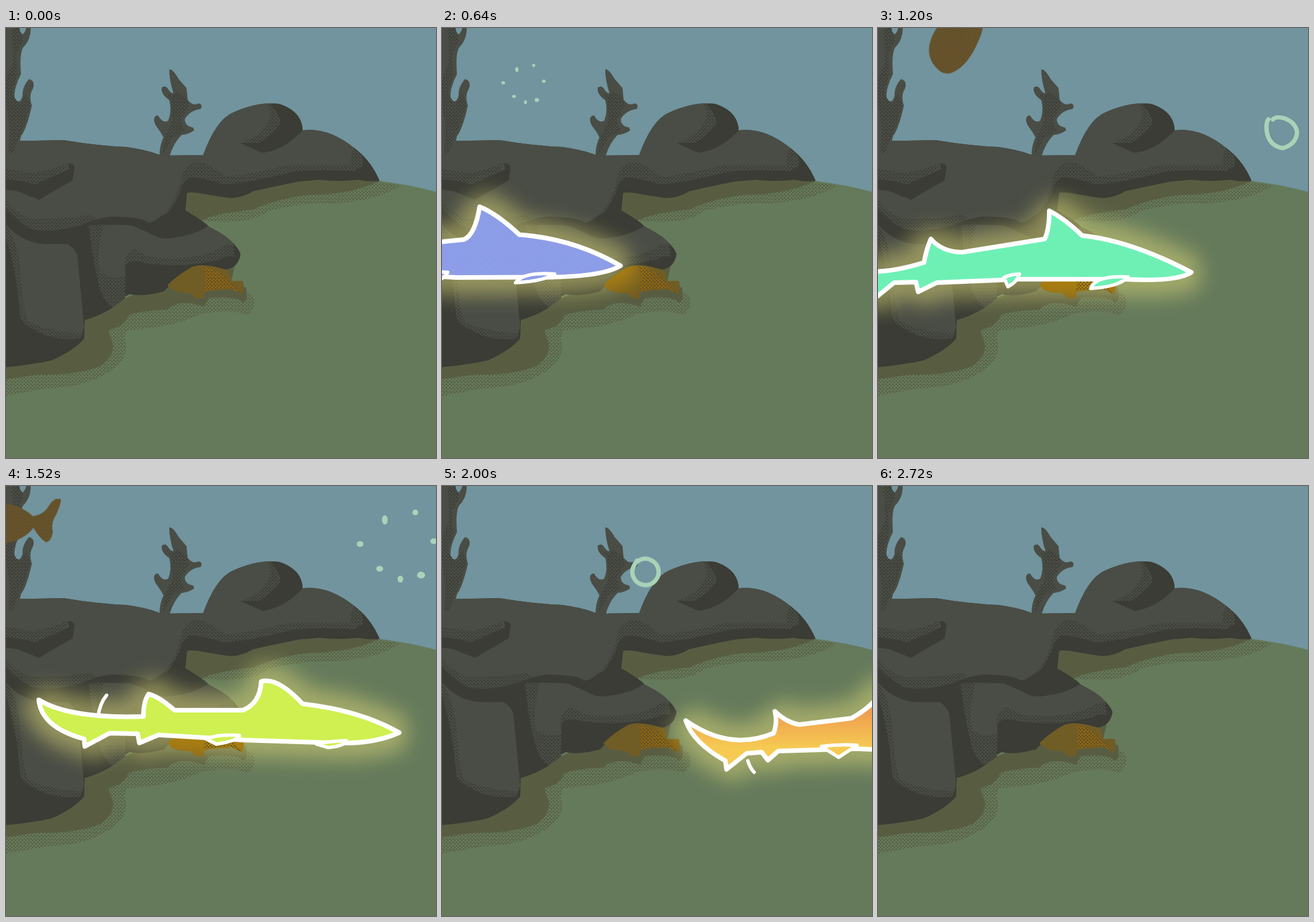
An HTML page without scripts that plays this animation: 748 px wide and 748 px high, repeating every 2.88 s.

```html
<!DOCTYPE html>
<html lang="en">
<head>
<meta charset="utf-8">
<title>Glowing shark</title>
<style>
  html, body { margin: 0; width: 100%; height: 100%; overflow: hidden; background: #71949e; }
  svg { display: block; width: 748px; height: 748px; }
  .rock { fill: #4a4d45; }
  .coral { fill: #4a4d45; stroke: #4a4d45; stroke-width: 2; stroke-linejoin: round; }
  .dark { fill: #3a3c35; }
  .shade { fill: #585d42; }
  .dots { fill: url(#rockDots); }

  .swim, .pose, .tint, .flick, .diver, .rise, .ring, .hold, .burst {
    animation-duration: 2880ms;
    animation-iteration-count: infinite;
  }

  /* Every segment is cut into 80 ms steps. */
  .swim { animation-name: swim; }
  @keyframes swim {
    0% { transform: translateX(-700px); animation-timing-function: steps(1); }
    2.77% { transform: translateX(-200px); animation-timing-function: steps(4); }
    13.88% { transform: none; animation-timing-function: steps(1); }
    69.44% { transform: none; animation-timing-function: steps(8); }
    91.66%, 100% { transform: translateX(500px); }
  }

  .pose { animation-name: pose; }
  @keyframes pose {
    0%, 13.88% { d: var(--a); animation-timing-function: steps(6); }
    30.55% { d: var(--b); animation-timing-function: steps(4); }
    41.66% { d: var(--c); animation-timing-function: steps(4); }
    52.77% { d: var(--d); animation-timing-function: steps(6); }
    69.44%, 100% { d: var(--e); }
  }
  .body {
    --a: path("M-450 380Q-390 430 -270 395Q-262 370 -255 355Q-235 375 -200 382L-62 365Q-40 360 -30 300Q-4 328 36 362Q130 365 209 415Q195 430 90 433L-60 434L-230 425L-275 440L-280 425L-315 425L-350 455L-352 440Q-435 430 -450 380Z");
    --b: path("M-250 380Q-190 430 -70 395Q-62 370 -55 355Q-35 375 0 382L138 371Q155 360 161 322Q195 318 233 357Q330 368 412 412Q370 433 290 434L110 434L-30 425L-75 440L-80 425L-115 425L-150 455L-152 440Q-235 430 -250 380Z");
    --c: path("M-90 395Q-40 445 80 408Q84 385 92 367Q112 390 147 390L290 367Q298 350 298 318Q325 332 355 361Q440 370 545 425Q520 442 430 437L245 437L102 443L70 459L66 442L28 443L-5 470L-8 458Q-75 445 -90 395Z");
    --d: path("M57 372Q110 405 239 401Q239 375 248 362Q266 366 293 390L412 390Q442 378 444 340Q472 332 516 379Q615 390 684 429Q640 449 575 447L415 442L265 433L232 447L229 431L180 430L137 453L136 440Q62 420 57 372Z");
    --e: path("M424 408Q500 462 577 430Q584 410 579 392Q600 412 622 415L712 404Q748 385 770 352Q790 365 830 400Q930 415 1000 450Q950 470 890 465L722 457L585 461L567 477L556 463L530 465L495 493L493 478Q437 447 424 408Z");
  }
  .front-fin {
    --a: path("M20 439Q35 425 88 428Q75 438 20 439Z");
    --b: path("M236 447Q250 422 304 428Q280 442 236 447Z");
    --c: path("M370 453Q378 430 435 433Q420 450 370 453Z");
    --d: path("M540 449Q560 444 592 443Q590 452 560 455Z");
    --e: path("M850 470Q870 460 905 460Q890 475 850 470Z");
  }
  .rear-fin {
    --a: path("M-120 428Q-105 424 -90 425Q-100 440 -118 446Z");
    --b: path("M76 427Q90 423 110 425Q105 435 80 445Z");
    --c: path("M219 434Q232 428 246 428Q242 442 226 450Z");
    --d: path("M348 440Q370 431 406 434Q405 443 366 449Z");
    --e: path("M660 453Q690 449 722 451Q705 462 690 472Z");
  }
  .tail-mark {
    --a: path("M-330 402Q-327 378 -315 364");
    --b: path("M-130 402Q-127 378 -115 364");
    --c: path("M10 405Q13 385 25 370");
    --d: path("M160 402Q163 378 175 364");
    --e: path("M532 478Q536 491 543 498");
  }
  .flick { animation-name: flick; animation-timing-function: step-end; }
  @keyframes flick {
    0% { opacity: 0; }
    49.99% { opacity: 1; }
    77.77%, 100% { opacity: 0; }
  }

  .tint { animation-name: tint; }
  @keyframes tint {
    0% { stop-color: #e858c8; animation-timing-function: steps(5); }
    13.88% { stop-color: #ad62e6; animation-timing-function: steps(6); }
    30.55% { stop-color: #6cd8e8; animation-timing-function: steps(4); }
    41.66% { stop-color: #6ef0b5; animation-timing-function: steps(4); }
    52.77% { stop-color: #cff050; animation-timing-function: steps(6); }
    69.44% { stop-color: var(--late); animation-timing-function: steps(8); }
    91.66%, 100% { stop-color: #ee7050; }
  }
  .line { fill: url(#skin); stroke: #fff; stroke-width: 8; stroke-linejoin: round; stroke-linecap: round; }
  .fin { stroke-width: 6; }
  .glow { fill: #dcd878; stroke: #dcd878; stroke-width: 60; stroke-linejoin: bevel; }
  .lit { fill: #b4850f; stroke: #b4850f; stroke-width: 70; stroke-linejoin: round; }

  .diver { animation-name: dive; }
  @keyframes dive {
    0% { transform: translate(200px, -150px) rotate(-65deg); animation-timing-function: steps(1); }
    33.33% { transform: translate(200px, -110px) rotate(-65deg); animation-timing-function: steps(3); }
    41.66% { transform: translate(145px, 3px) rotate(-53deg); animation-timing-function: steps(4); }
    52.77% { transform: translate(-2px, 64px) rotate(3deg); animation-timing-function: steps(3); }
    61.10%, 100% { transform: translate(-130px, 85px) rotate(5deg); }
  }

  /* Bubbles rise, grow and burst; each one runs the same cycle 800 ms later. */
  .rise { animation-name: rise; }
  @keyframes rise {
    0%, 8.33% { transform: translate(0, 40px); animation-timing-function: steps(2); }
    13.88% { transform: none; animation-timing-function: steps(4); }
    24.99% { transform: translate(var(--drift), -79px); animation-timing-function: steps(2); }
    30.55%, 100% { transform: translate(var(--drift), -95px); }
  }
  .hold { animation-name: hold; animation-timing-function: step-end; }
  @keyframes hold {
    0% { opacity: 0; }
    8.33% { opacity: 1; }
    19.44%, 100% { opacity: 0; }
  }
  .ring { fill: none; stroke: #a9d3b8; stroke-width: 7.5; stroke-linecap: round; vector-effect: non-scaling-stroke; animation-name: grow; }
  @keyframes grow {
    0%, 8.33% { transform: scale(.25); animation-timing-function: steps(2); }
    13.88% { transform: none; animation-timing-function: steps(2); }
    19.44%, 100% { transform: scale(1.15); }
  }
  .burst { fill: #a9d3b8; animation-name: burst; animation-timing-function: step-end; }
  @keyframes burst {
    0% { opacity: 0; transform: scale(.5); }
    19.44% { opacity: 1; transform: scale(.55); }
    22.22% { opacity: 1; transform: scale(.8); }
    24.99% { opacity: 1; transform: none; }
    27.77% { opacity: 1; transform: scale(1.1); }
    30.55%, 100% { opacity: 0; transform: scale(1.1); }
  }
  .second * { animation-delay: -2080ms; }
  .third * { animation-delay: -1280ms; }
</style>
</head>
<body>
<svg viewBox="0 0 748 748" xmlns="http://www.w3.org/2000/svg">
  <defs>
    <path id="dotPair" d="M0 0h3v3h-3zM3 3h3v3h-3z" transform="translate(.4 .4) scale(.87)"/>
    <pattern id="rockDots" width="6" height="6" patternUnits="userSpaceOnUse"><use href="#dotPair" fill="#3a3c35"/></pattern>
    <pattern id="shadeDots" width="6" height="6" patternUnits="userSpaceOnUse"><use href="#dotPair" fill="#585d42"/></pattern>
    <pattern id="fishDots" width="6" height="6" patternUnits="userSpaceOnUse"><use href="#dotPair" fill="#4b4429"/></pattern>
    <linearGradient id="skin" gradientUnits="userSpaceOnUse" x1="0" y1="395" x2="0" y2="455">
      <stop class="tint" style="--late:#ef9f50"/>
      <stop class="tint" style="--late:#f6ca52" offset="1"/>
    </linearGradient>
    <filter id="soft" filterUnits="userSpaceOnUse" x="-650" y="150" width="1800" height="500"><feGaussianBlur stdDeviation="17"/></filter>
    <path id="floorFish" d="M281 447Q300 428 325 415Q350 408 388 423L392 440L412 440Q415 450 411 463L400 458Q390 450 388 456Q360 455 345 460L344 470L330 470L320 461Q290 462 281 447Z"/>
    <path id="scales" d="M340 413Q350 430 344 458L388 452L411 463L388 440L372 425Z"/>
    <clipPath id="floorFishClip"><use href="#floorFish"/></clipPath>
    <path id="diverShape" d="M-80 16Q-80 -10 -62 -24Q-45 -36 -18 -36Q25 -34 48 -14Q68 -18 75 -34Q84 -50 95 -46Q96 -38 88 -18Q80 -5 84 11Q83 28 73 30Q60 22 50 6Q35 29 0 36Q-40 46 -66 34Q-78 28 -80 16Z"/>
    <g id="drops">
      <ellipse cx="-68" cy="-3" rx="6" ry="5"/><ellipse cx="-25" cy="-45" rx="5" ry="8"/>
      <circle cx="28" cy="-58" r="5"/><ellipse cx="60" cy="-8" rx="6" ry="5"/>
      <ellipse cx="38" cy="51" rx="7" ry="6"/><ellipse cx="2" cy="58" rx="5" ry="6"/>
      <ellipse cx="-34" cy="40" rx="6" ry="5"/>
    </g>
  </defs>

  <rect width="748" height="748" fill="#71949e"/>
  <path fill="#657a5b" d="M300 256H630L650 266Q700 272 748 285V748H0V400Z"/>

  <!-- ground shadows -->
  <path fill="url(#shadeDots)" d="M340 335Q420 345 460 317Q520 303 570 305Q650 300 686 274L640 266L310 290ZM0 640L70 627Q150 625 190 590Q215 570 207 545Q205 530 215 525Q290 522 340 497Q400 488 420 500Q433 490 432 475Q430 460 418 460L300 430L0 560Z"/>
  <path class="shade" d="M312 317L340 335Q365 322 430 316Q470 297 530 290Q600 290 650 266L630 258H500L310 284ZM0 611Q40 605 60 603Q120 605 165 588Q195 565 183 540Q178 530 180 525Q205 520 213 500Q230 492 280 490Q300 470 345 485L352 470Q400 465 413 478L419 470L418 452L392 440L398 412L300 430L0 560Z"/>

  <path class="coral" d="M268 222Q268 205 275 190Q270 180 262 170Q254 155 264 153Q272 168 283 162Q290 145 285 125Q270 115 272 104Q278 100 282 108Q290 118 292 112Q285 90 285 73Q290 73 300 90L313 105L315 125Q325 138 335 132Q342 134 338 140Q320 142 310 158Q310 172 325 174L326 178Q315 185 305 185Q290 200 284 222Z"/>
  <path class="dots" d="M274 108Q290 125 296 110L313 120L318 136L304 160L310 180L290 190L272 222L276 190L290 160L288 126Z"/>

  <!-- rocks: dark mass, then lit faces and halftone edges -->
  <path class="dark" d="M0 197L100 195Q160 205 210 207Q250 213 270 222L343 221Q365 160 395 147Q440 127 475 132Q515 145 516 178Q560 172 605 208Q635 230 650 266Q630 268 612 264Q580 268 545 264L510 267Q460 277 430 284Q410 296 390 296Q350 290 335 287Q320 285 315 287L312 317Q350 340 352 345Q400 370 408 393Q405 415 385 420L330 415Q290 440 275 458Q240 468 215 463Q200 470 185 487Q160 502 137 508L136 540Q120 560 80 578Q50 585 0 590Z"/>
  <g class="rock">
    <path d="M0 197L100 195Q160 205 210 207Q250 213 270 222L343 221Q365 160 395 147Q440 127 475 132Q515 145 516 178Q560 172 605 208Q625 222 620 240L605 249Q530 244 490 252Q430 268 380 272Q345 262 330 260Q308 258 303 285Q285 325 273 325Q255 340 247 338Q235 328 180 328Q150 333 130 343Q80 357 50 351Q30 345 0 315Z"/>
    <path d="M0 342Q30 375 70 376L108 376Q120 385 124 395L136 520L130 540Q80 545 50 525Q25 515 25 500Q18 420 0 365Z"/>
    <path d="M144 343Q190 341 220 344L250 357Q265 367 285 366Q330 360 350 345Q385 360 395 375L397 398Q385 395 375 402Q300 420 240 408Q212 402 208 415L207 470L185 487Q165 470 160 440Q150 400 144 343Z"/>
  </g>
  <g class="dots">
    <path d="M605 208Q595 235 600 238H490Q430 255 380 258Q350 232 330 232Q305 240 303 270Q290 310 273 325Q285 325 303 285Q308 258 330 260L380 272Q430 268 490 252Q530 244 605 249L620 240Q625 222 605 208Z"/>
    <path d="M0 300Q20 325 45 332Q100 333 145 325L158 330L130 343Q80 357 50 351Q30 345 0 315ZM0 245Q30 250 50 252Q85 245 105 235V245Q90 255 50 272Q30 265 0 263Z"/>
    <path d="M455 133Q465 150 455 165Q440 190 408 200L440 203Q465 185 478 165L462 133Z"/>
    <path d="M0 342Q20 370 25 420Q30 500 40 510Q60 525 134 532L128 545Q60 540 28 515Q20 430 0 365Z"/>
    <path d="M144 343H170Q155 400 165 425Q185 440 207 430V470L185 487Q165 470 160 440Q148 400 144 343ZM208 430Q200 390 225 385L250 398Q340 408 385 375L397 380V398Q300 420 240 408Q212 402 208 430Z"/>
  </g>
  <path class="dark" d="M0 263Q30 265 50 272Q90 255 110 245L107 235Q120 235 119 245L116 265Q75 288 58 299Q35 290 20 284L0 281ZM460 132Q475 150 478 165Q465 185 440 200H408Q440 215 447 217Q485 212 516 178Q515 145 475 132Z"/>

  <path class="coral" d="M0 0H23Q22 10 30 12Q36 5 36 0H42Q42 20 30 32Q22 42 25 80Q10 110 15 125Q25 135 30 118Q28 105 40 90Q50 92 46 105Q38 118 44 135Q35 175 25 188Q23 200 15 218H0Z"/>
  <path class="dots" d="M10 0H23L30 20L18 45L20 80L10 115L24 132L36 112L42 135Q30 175 23 188L12 218H4L6 170L0 130V90L12 60Z"/>

  <!-- glow and resting fish -->
  <g opacity=".52"><g filter="url(#soft)"><g class="swim"><path class="pose body glow"/></g></g></g>
  <use href="#floorFish" fill="#705c25"/>
  <use href="#scales" fill="#8a6518"/>
  <g clip-path="url(#floorFishClip)" opacity=".85"><g filter="url(#soft)"><g class="swim"><path class="pose body lit"/></g></g></g>
  <use href="#scales" fill="url(#fishDots)" opacity=".7"/>

  <!-- shark -->
  <g class="swim">
    <g class="flick"><path class="pose tail-mark line fin"/></g>
    <path class="pose body line"/>
    <path class="pose rear-fin line fin"/>
    <path class="pose front-fin line fin"/>
  </g>

  <!-- passing fish -->
  <g class="diver">
    <use href="#diverShape" fill="#69542b"/>
    <use href="#diverShape" fill="url(#fishDots)" opacity=".4"/>
  </g>

  <!-- bubbles -->
  <g transform="translate(144 138) scale(.69)" style="--drift:0px">
    <g class="rise">
      <g class="hold"><path class="ring" d="M-16 -23Q5 -31 21 -19Q29 -5 23 14Q14 28 -2 27Q-20 20 -25 0Q-26 -14 -22 -20Z"/></g>
      <g class="burst"><use href="#drops"/></g>
    </g>
  </g>
  <g class="second" transform="translate(702 183)" style="--drift:-18px">
    <g class="rise">
      <g class="hold"><path class="ring" d="M-15 -24Q-10 -30 5 -26Q26 -18 27 0Q24 20 2 26Q-22 22 -26 -4Q-27 -20 -23 -24"/></g>
      <g class="burst"><use href="#drops"/></g>
    </g>
  </g>
  <g class="third" transform="translate(354 150) scale(.88)" style="--drift:22px">
    <g class="rise">
      <g class="hold"><path class="ring" d="M-15 -22A26 26 0 1 1 -23 -13L-17 -23"/></g>
      <g class="burst"><use href="#drops"/></g>
    </g>
  </g>
</svg>
</body>
</html>
```
